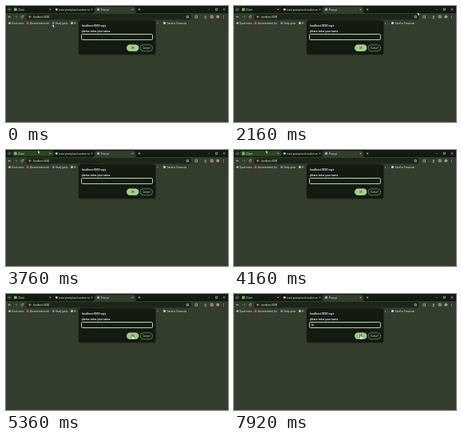
An HTML page that plays this animation: 278x146 px, repeating every 8 s.

```html
<!DOCTYPE html>
<html lang="en">
<head>
<meta charset="utf-8">
<title>Browser prompt</title>
<style>
  html, body { margin: 0; width: 100%; height: 100%; overflow: hidden; background: #333d2c; }
  svg { display: block; width: 100vw; height: 100vh; }
  text { font-family: Roboto, Arial, sans-serif; font-size: 3.1px; fill: #e6ebe1; }
  .bookmark { font-size: 2.9px; }
  .dialog { font-size: 3.4px; font-weight: 500; fill: #fff; }
  .ok { fill: #1d3b14; }
  .line { fill: none; stroke: #d3dbcc; stroke-width: .6; }
</style>
</head>
<body>
<svg viewBox="0 0 278 146" preserveAspectRatio="none">
  <rect width="278" height="146" fill="#333d2c"/>

  <!-- Tab strip -->
  <rect width="278" height="9" fill="#121b0f"/>
  <rect x="1.5" y="1.5" width="5.5" height="5.5" rx="1.8" fill="#303b2a"/>
  <path class="line" d="M3.3 3.8l1 1 1-1"/>
  <rect id="tabHover" x="8" y="1" width="51.5" height="6.7" rx="2" fill="#27491d"/>
  <path d="M109 9q2 0 2-2V3q0-2 2-2h47q2 0 2 2v4q0 2 2 2z" fill="#333d2c"/>
  <rect x="10" y="2.6" width="3.6" height="3.6" fill="#69bd68"/>
  <text x="15.2" y="5.6">Client</text>
  <circle cx="63.3" cy="4.4" r="1.4" fill="#d5dccf"/>
  <text x="66" y="5.6">react prompt and confirm ex</text>
  <circle cx="115.5" cy="4.4" r="1.7" fill="#9bb4d0"/>
  <text x="118.7" y="5.6">Prompt</text>
  <path class="line" d="M54.3 3.5l1.8 1.8m0-1.8l-1.8 1.8M106.6 3.5l1.8 1.8m0-1.8l-1.8 1.8M157.6 3.5l1.8 1.8m0-1.8l-1.8 1.8M165.6 4.4h2.8m-1.4-1.4v2.8"/>
  <path class="line" d="M262.4 3.2h2.2v2.2h-2.2zM272 3.2l2.3 2.3m0-2.3l-2.3 2.3"/>
  <path class="line" opacity=".5" d="M253 4.4h2.5"/>

  <!-- Toolbar -->
  <rect x="25" y="10" width="207" height="7.3" rx="3.65" fill="#1d2519"/>
  <path class="line" d="M6 13.6H3m1.3-1.3L3 13.6l1.3 1.3M21.6 12.7a1.4 1.4 0 1 0 .1 1.7M21.7 11.8v1.1h-1.1"/>
  <path class="line" opacity=".4" d="M11 13.6h3m-1.3-1.3l1.3 1.3-1.3 1.3"/>
  <circle cx="29.8" cy="13.6" r="1.8" fill="#3b4834"/>
  <circle class="line" cx="29.8" cy="13.6" r=".8"/>
  <text x="34" y="14.8">localhost:3000</text>
  <path class="line" d="M227.3 11.9l.5 1.1 1.2.1-.9.8.3 1.2-1.1-.6-1.1.6.3-1.2-.9-.8 1.2-.1z"/>
  <path class="line" d="M237 12.3h2.5v2.8H237zM249.8 11.8v2.3m-1-1l1 1 1-1M248.4 15.2h2.8M256.2 12h3v3h-3zM258 12v3"/>
  <path d="M243.7 11v5" stroke="#53614a" stroke-width=".4"/>
  <circle cx="265.3" cy="13.6" r="2" fill="#c08a7c"/>
  <path d="M272.5 11.9v3.6" stroke="#d3dbcc" stroke-width=".7" stroke-dasharray=".7 .75"/>

  <g id="bookmarks"></g>

  <!-- Dialog -->
  <rect x="90.7" y="18.2" width="97" height="43.8" rx="3.5" fill="#0a0e08" opacity=".3"/>
  <rect x="91" y="17.8" width="96.3" height="43.2" rx="3" fill="#141a12"/>
  <text class="dialog" x="94.8" y="26.2">localhost:3000 says</text>
  <text class="dialog" x="94.8" y="32.5">please enter your name</text>
  <rect x="94.5" y="35.5" width="89" height="7" rx="1.2" fill="#141a12" stroke="#b2de98"/>
  <text class="dialog" id="typed" x="97" y="40.4"></text>
  <rect id="ok" x="151" y="48.5" width="15.4" height="8.6" rx="4.2" fill="#9fd684"/>
  <text class="ok" x="158.7" y="53.9" text-anchor="middle">OK</text>
  <rect x="168.2" y="48.8" width="15.3" height="8" rx="4" fill="none" stroke="#84a075" stroke-width=".7"/>
  <text x="175.8" y="53.9" text-anchor="middle">Cancel</text>

  <g id="cursor">
    <path id="arrow" d="M0 0v3.6l.8-.7.6 1.3.6-.3-.5-1.2h1.1z" fill="#fff" stroke="#111" stroke-width=".2"/>
    <path id="beam" d="M-.7-1.6h1.4M0-1.6v3.2M-.7 1.6H.7" fill="none" stroke="#fff" stroke-width=".5"/>
    <path id="hand" d="M-.5 0q.6-.6 1.1 0v1.8l2 .5q.6.2.5.9l-.5 1.9H-.1l-1.6-2q0-.7.7-.5l.5.4z" fill="#fff" stroke="#111" stroke-width=".3"/>
  </g>
</svg>
<script>
  const $ = id => document.getElementById(id);
  const DURATION = 8000, STEP = 80;

  const bookmarks = [
    [3, '#aab5a2', 'Quick notes'],
    [25.5, '#d45b50', 'Documentation list'],
    [58, '#5795e5', 'Study guide'],
    [81, '#c3ccbb', 'Pr'],
    [197, '#dfe5d8', 'Travel to Tomorrow']
  ];
  $('bookmarks').innerHTML = bookmarks.map(([x, color, label]) =>
    `<circle cx="${x + 1.5}" cy="21.5" r="1.5" fill="${color}"/>
     <text class="bookmark" x="${x + 4.2}" y="22.6">${label}</text>`
  ).join('') + '<text class="bookmark" x="189" y="22.6">s</text>';

  // Pointer stops: time, x, y
  const path = [
    [0, 58.5, 23], [160, 58.5, 23], [960, 230, 8], [2320, 230, 8],
    [2720, 165, 32], [2880, 150, 36], [3200, 150, 37], [3680, 40, 0.5],
    [4160, 40, 0.5], [4480, 108, 20.5], [4640, 113, 23], [4800, 113, 23],
    [5360, 158, 52], [7520, 148, 40], [7840, 158.5, 51.8], [8000, 158.5, 51.8]
  ];

  const clamp = value => Math.min(1, Math.max(0, value));

  function pointerAt(time) {
    const next = path.findIndex(stop => stop[0] > time);
    const [t0, x0, y0] = path[next - 1], [t1, x1, y1] = path[next];
    const p = (time - t0) / (t1 - t0), eased = p * p * (3 - 2 * p);
    return [x0 + (x1 - x0) * eased, y0 + (y1 - y0) * eased];
  }

  const inside = (x, y, left, top, right, bottom) =>
    x >= left && x <= right && y >= top && y <= bottom;
  const show = (id, visible) => $(id).style.display = visible ? '' : 'none';

  function draw(now) {
    const time = Math.floor(now % DURATION / STEP) * STEP;
    const [x, y] = pointerAt(time);
    const hidden = time >= 5520 && time < 7520;
    const overInput = inside(x, y, 95, 35, 184, 43);
    const overButton = inside(x, y, 151, 48, 167, 57);

    show('cursor', !hidden);
    $('cursor').setAttribute('transform', `translate(${x} ${y})`);
    show('beam', overInput);
    show('hand', overButton);
    show('arrow', !overInput && !overButton);
    // The tab highlight fades in on hover and lingers after the pointer leaves.
    $('tabHover').style.opacity = Math.min(clamp((time - 3520) / 160), clamp((4640 - time) / 320));
    $('ok').setAttribute('fill', overButton && !hidden ? '#98cc7e' : '#9fd684');
    $('typed').textContent = time < 6000 ? '' : time < 6240 ? 'h' : 'hi';
    requestAnimationFrame(draw);
  }
  requestAnimationFrame(draw);
</script>
</body>
</html>
```
